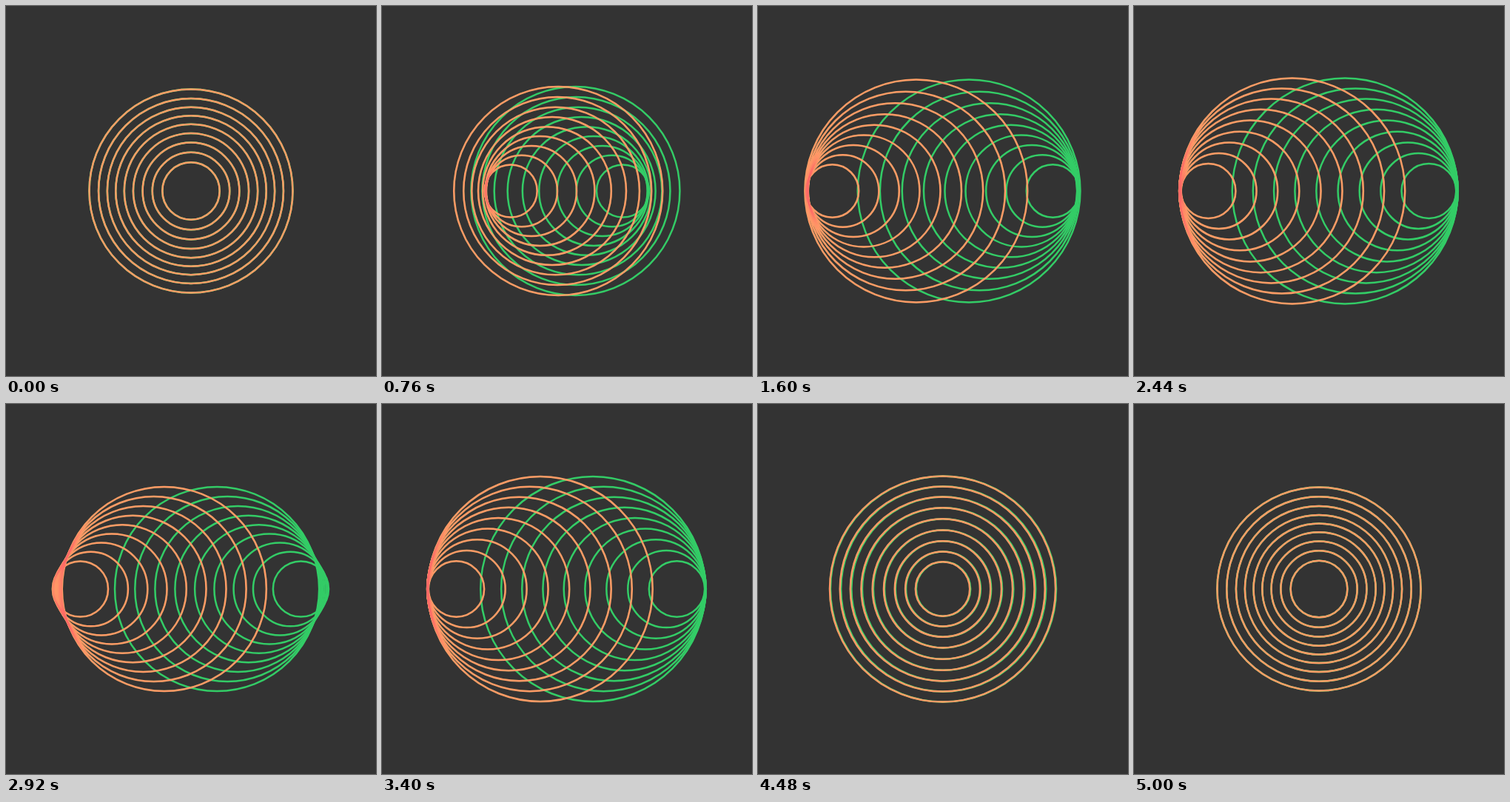
Recreate the animation shown at these times as an HTML page. Size 500 by 500 pixels, loop 5.04 s.

```html
<!DOCTYPE html>
<html lang="en">
<head>
<meta charset="utf-8">
<title>Pulsing rings</title>
<style>
  html, body { margin: 0; width: 100%; height: 100%; overflow: hidden; background: #333; }
  svg { display: block; width: 100%; height: 100%; }
  circle { fill: none; stroke-width: 2.5; }
  .green circle { stroke: #33cc66; }
  .coral { filter: url(#heat); }
  .coral circle { stroke: #f96; stroke-opacity: 0.5; }
</style>
</head>
<body>
<svg viewBox="0 0 500 500">
  <!-- single lines are orange, stacked lines turn pink -->
  <filter id="heat" filterUnits="userSpaceOnUse" x="0" y="0" width="500" height="500"
          color-interpolation-filters="sRGB">
    <feColorMatrix values="0 0 0 0 1
                           0 0 0 -0.4 0.8
                           0 0 0 0 0.4
                           0 0 0 2 0"/>
  </filter>
  <g class="green"></g>
  <g class="coral"></g>
</svg>
<script>
const LOOP = 5040, STEP = 40, BEAT = LOOP / 5, RINGS = 9, LAST = RINGS - 1;
const INNER = 39.4, GAP = 14.17, SHRINK = 0.1;  // full ring radii and pulse depth
const MOVE = 1008, STAGGER = 35;

const clamp = v => Math.min(1, Math.max(0, v));

// cubic-bezier(.25, .1, .25, 1)
function ease(x) {
  if (x <= 0 || x >= 1) return clamp(x);
  let lo = 0, hi = 1;
  for (let k = 0; k < 24; k++) {
    const u = (lo + hi) / 2, v = 1 - u;
    if (0.75 * v * v * u + 0.75 * v * u * u + u * u * u < x) lo = u; else hi = u;
  }
  const u = lo, v = 1 - u;
  return 0.3 * v * v * u + 3 * v * u * u + u * u * u;
}

// eased trip out and back
const trip = (t, out, back) => ease((t - out) / MOVE) - ease((t - back) / MOVE);

function radius(i, t) {
  const turn = t / BEAT + (LAST - i) * 0.035 + 0.98;
  const half = (turn % 1) * 2;
  const swell = half < 1 ? ease(half) : 1 - ease(half - 1);
  return (INNER + GAP * i) * (1 - SHRINK * (1 - swell));
}

// the whole set slides sideways, inner rings slide further
function shift(i, t, side) {
  const lag = STAGGER * i;
  return side * trip(t, 545, 3620)
    + GAP * (LAST - i) * trip(t, 430 + lag, 3400 + lag);
}

function makeRings(name) {
  const group = document.querySelector(name);
  return Array.from({ length: RINGS }, () => {
    const ring = document.createElementNS(group.namespaceURI, "circle");
    ring.setAttribute("cy", 250);
    return group.appendChild(ring);
  });
}

const sets = [
  { rings: makeRings(".green"), dir: 1, side: 35.1 },
  { rings: makeRings(".coral"), dir: -1, side: 36.2 }
];

function draw(t) {
  for (const { rings, dir, side } of sets) {
    rings.forEach((ring, i) => {
      ring.setAttribute("cx", 250 + dir * shift(i, t, side));
      ring.setAttribute("r", radius(i, t));
    });
  }
}

const start = performance.now();
function tick() {
  const t = (performance.now() - start) % LOOP;
  draw(Math.floor(t / STEP) * STEP);
  requestAnimationFrame(tick);
}
tick();
</script>
</body>
</html>
```
